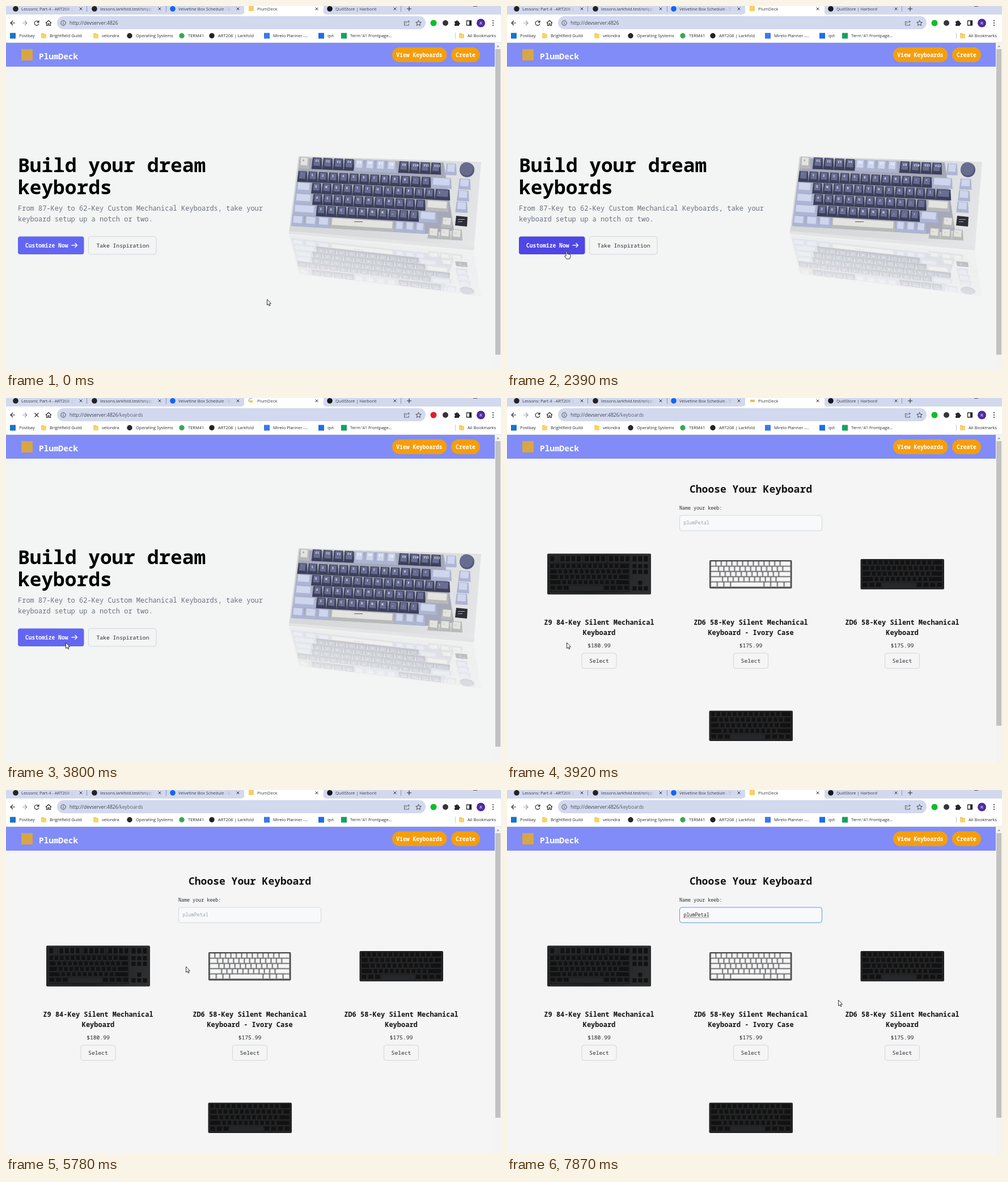
An HTML page with a canvas that plays this animation: 873 px wide and 642 px high, repeating every 7.99 s.

```html
<!DOCTYPE html>
<html lang="en">
<head>
<meta charset="utf-8">
<title>PlumDeck</title>
<style>
html, body { margin: 0; width: 100%; height: 100%; overflow: hidden; background: #f5f5f5; }
canvas { display: block; }
</style>
</head>
<body>
<canvas id="stage" width="873" height="642"></canvas>
<script>
const LOOP = 7990;
const MONO = '"Noto Sans Mono", "DejaVu Sans Mono", monospace';
const SANS = '"Open Sans", "Noto Sans", sans-serif';
const STRIP = '#d2d9ee', INK = '#2b2d31', LINE = '#d1d5db';
const stage = document.getElementById('stage').getContext('2d');
let g = stage;

// Drawing helpers
function text(s, x, y, size, { color = INK, weight = 400, font = MONO, align = 'left' } = {}) {
  g.font = `${weight} ${size}px ${font}`;
  g.fillStyle = color;
  g.textAlign = align;
  g.fillText(s, x, y);
}
function rect(x, y, w, h, color) {
  g.fillStyle = color;
  g.fillRect(x, y, w, h);
}
function box(x, y, w, h, r, fill, stroke, width = 1) {
  g.beginPath();
  g.roundRect(x, y, w, h, r);
  paint(fill, stroke, width);
}
function paint(fill, stroke, width = 1) {
  if (fill) { g.fillStyle = fill; g.fill(); }
  if (stroke) { g.strokeStyle = stroke; g.lineWidth = width; g.stroke(); }
}
function disc(x, y, r, fill, stroke, width) {
  g.beginPath();
  g.arc(x, y, r, 0, 7);
  paint(fill, stroke, width);
}
function poly(points, fill, stroke, width) {
  g.beginPath();
  points.forEach(([x, y]) => g.lineTo(x, y));
  g.closePath();
  paint(fill, stroke, width);
}
function icon(x, y, d, color = INK, width = 1.2, fill) {
  g.save();
  g.translate(x, y);
  const path = new Path2D(d);
  if (fill) { g.fillStyle = fill; g.fill(path); }
  g.strokeStyle = color;
  g.lineWidth = width;
  g.lineJoin = 'round';
  g.stroke(path);
  g.restore();
}
function layer(draw) {
  const c = document.createElement('canvas');
  c.width = 873;
  c.height = 642;
  const previous = g;
  g = c.getContext('2d');
  draw();
  g = previous;
  return c;
}

// Key layouts, in key units
const run = (first, count, last) => [...first, ...Array(count).fill(1), ...last];
const COMPACT = [
  run([], 13, [2]), run([1.5], 12, [1.5]), run([1.75], 11, [2.25]),
  run([2.25], 10, [2.75]), [1.25, 1.25, 1.25, 6.25, 1.25, 1.25, 1.25, 1.25]
];

// Hero keyboard
const TONES = {
  D: ['#3c405b', '#686d91', '#e9ebf5'],
  L: ['#adb5d3', '#ced5ed', '#ffffff'],
  B: ['#b8b9b9', '#e3e3df', '#777777']
};
function heroKey(c, r, w, tone, label = '') {
  const x = 517 + 18.15 * c - 2.6 * r;
  const slope = 0.8 + 0.05 * r;
  const y = (r < 1 ? 266 + 25 * r : 291 + 19.5 * (r - 1)) + c * slope;
  const [side, top, ink] = TONES[tone];
  const width = 18.15 * w - 0.8, drop = w * slope, h = r < 1 ? 20.5 : 19;
  poly([[x + 1.5, y], [x + width - 1, y + drop], [x + width, y + drop + h], [x - 1, y + h]], side);
  poly([[x + 3.5, y + 1], [x + width - 3, y + drop + 1], [x + width - 4, y + drop + h - 6], [x + 2.5, y + h - 6]], top);
  text(label, x + 6, y + 8, 5.5, { color: ink, weight: 600 });
}
function drawHeroKeyboard() {
  const body = g.createLinearGradient(500, 270, 830, 430);
  body.addColorStop(0, '#d4d6d8');
  body.addColorStop(0.6, '#d9dbdd');
  body.addColorStop(1, '#e5e7e8');
  poly([[516, 265], [838, 275], [825, 431], [499, 400]], body);
  poly([[500, 397], [826, 424], [825, 431], [499, 402]], '#e3e5e5');
  poly([[518, 268], [772, 276], [790, 396], [740, 402], [503, 388]], '#a5a9ba');

  heroKey(0, 0, 1.05, 'B', '⎋');
  [[1.25, 'D'], [5.35, 'L'], [9.68, 'D']].forEach(([start, tone], group) => {
    for (let i = 0; i < 4; i++) heroKey(start + i * 1.04, 0, 1.03, tone, 'F' + (group * 4 + i + 1));
  });
  heroKey(14.25, 0, 1.1, 'L');
  const rows = [
    [COMPACT[0], 'DDL', '`1234567890-='],
    [COMPACT[1], 'LDD', ' QWERTYUIOP[]\\'],
    [COMPACT[2], 'LDB', " ASDFGHJKL;'"],
    [run([2.25], 10, [1.75]), 'LDL', ' ZXCVBNM,./'],
    [[1.25, 1.25, 1.25, 6.25, 1, 1, 1], 'LLL', '']
  ];
  rows.forEach(([widths, tones, labels], r) => {
    let c = 0;
    widths.forEach((w, i) => {
      const tone = w > 6 ? 'B' : tones[i === 0 ? 0 : i === widths.length - 1 ? 2 : 1];
      heroKey(c, r + 1, w, tone, labels[i]);
      c += w;
    });
  });
  for (let r = 1; r < 4; r++) heroKey(15.65, r, 1.2, 'L');
  heroKey(14.45, 4.4, 1.15, 'B', '↑');
  ['←', '↓', '→'].forEach((s, i) => heroKey(13.3 + i * 1.13, 5.4, 1.12, 'B', s));

  poly([[794, 370], [814, 372], [813, 389], [792, 387]], '#2d2e36');
  rect(797, 376, 12, 1, '#a9abb5');
  rect(797, 380, 8, 1, '#a9abb5');
  disc(813, 289, 13, '#55597a');
  disc(812, 287, 11.5, '#686d90');
  rect(614, 380, 15, 1, '#555');
}
const heroKeyboard = layer(drawHeroKeyboard);
const hero = layer(() => {
  g.save();
  g.globalAlpha = 0.27;
  g.transform(1, 0.1395, 0, -0.5, 0, 533);
  g.drawImage(heroKeyboard, 0, 0);
  g.restore();
  g.globalCompositeOperation = 'destination-out';
  const fade = g.createLinearGradient(640, 430, 625, 505);
  fade.addColorStop(0, 'rgba(0,0,0,0)');
  fade.addColorStop(1, 'rgba(0,0,0,.6)');
  rect(490, 395, 360, 140, fade);
  g.globalCompositeOperation = 'source-over';
  g.drawImage(heroKeyboard, 0, 0);
});

// Flat product keyboards
const BLACK = { frame: '#222324', gap: '#1b1b1c', side: '#2c2d2e', top: '#121213', bar: '#262728' };
const WHITE = { frame: '#4b4b4d', gap: '#5a5a5c', side: '#b9babb', top: '#f5f5f5', bar: '#f7f7f7' };
function flatKey(x, y, w, h, look, wide) {
  rect(x + 0.5, y + 0.5, w - 1, h - 1.2, look.side);
  rect(x + 1.4, y + 0.5, w - 3, h - 2.6, wide ? look.bar : look.top);
}
function keyBlock(x, y, w, h, look) {
  const unit = w / 15, rowHeight = h / 5;
  COMPACT.forEach((widths, r) => {
    let c = 0;
    widths.forEach(k => {
      flatKey(x + c * unit, y + r * rowHeight, k * unit, rowHeight, look, k > 6);
      c += k;
    });
  });
}
function compactBoard(x, y, w, h, look) {
  box(x, y, w, h, 2, look.frame);
  rect(x + 2, y + 2, w - 4, h - 4, look.gap);
  keyBlock(x + 2, y + 2, w - 4, h - 4, look);
}
function fullBoard(x, y, w, h) {
  const shade = g.createLinearGradient(x, y, x + w, y + h);
  shade.addColorStop(0, '#262728');
  shade.addColorStop(0.5, '#1f2021');
  shade.addColorStop(1, '#303132');
  box(x, y, w, h, 2, shade);
  rect(x + 4, y + 17, 142, 50, BLACK.gap);
  keyBlock(x + 4, y + 18, 142, 48, BLACK);
  const top = y + 4;
  flatKey(x + 4, top, 10, 12, BLACK);
  [22, 65, 108].forEach(start => {
    for (let i = 0; i < 4; i++) flatKey(x + start + i * 9.6, top, 9.6, 12, BLACK);
  });
  for (let i = 0; i < 3; i++) {
    const kx = x + 149 + i * 10;
    flatKey(kx, top, 10, 12, BLACK);
    flatKey(kx, y + 18, 10, 10, BLACK);
    flatKey(kx, y + 28, 10, 10, BLACK);
    flatKey(kx, y + 57, 10, 10, BLACK);
  }
  flatKey(x + 159, y + 47, 10, 10, BLACK);
}

// Browser window
const TABS = [
  [27, 'Lessons: Part 4 - ART208 | Larkfold', '#222'],
  [166, 'lessons.larkfold.test/snippets', '#222'],
  [304, 'Velvetine Box Schedule - Drift', '#1464f4'],
  [443, 'PlumDeck', null],
  [581, 'QuillStore | Harbord', '#17171c']
];
const BOOKMARKS = [
  [23, 'Postbay', 'square', '#1973c8'], [77, 'Brightfield Guild', 'folder'],
  [169, 'velondra', 'folder'], [229, 'Operating Systems', 'disc', '#27282b'],
  [321, 'TERM41', 'disc', '#38a852'], [374, 'ART208 | Larkfold', 'disc', '#222'],
  [471, 'Mirelo Planner -...', 'square', '#3979e8'], [567, 'qvt', 'square', '#1f6bea'],
  [607, "Term '41 Frontpage...", 'square', '#18a05e'], [814, 'All Bookmarks', 'folder']
];
function folder(x, y) {
  box(x, y, 5, 4, 1, '#e9bd4e');
  box(x, y + 1, 9, 8, 1, '#fad16c');
}
function drawTabs(t, loading) {
  rect(0, 0, 873, 15, STRIP);
  box(420, -8, 140, 24, 5, '#fff');
  rect(415, 13, 150, 3, '#fff');
  box(408, 2, 12, 13, [0, 0, 5, 0], STRIP);
  box(560, 2, 12, 13, [0, 0, 0, 5], STRIP);
  TABS.forEach(([x, label, color]) => {
    const ink = g.createLinearGradient(x + 76, 0, x + 94, 0);
    ink.addColorStop(0, '#3b3e44');
    ink.addColorStop(1, 'rgba(59,62,68,0)');
    text(label, x, 7.5, 7.5, { color: ink, font: SANS });
    icon(x + 105, 5, 'M-2.3-2.3 2.3 2.3M2.3-2.3-2.3 2.3', INK, 1);
    if (color) disc(x - 10, 5, 4.8, color);
  });
  if (loading) {
    const turn = Math.floor(t / 120) * 0.9;
    rect(430, 4, 5, 4, '#f3c64b');
    g.beginPath();
    g.arc(433, 5, 4.7, turn, turn + 2.2);
    paint(null, '#5a83d8', 1);
  } else if (t >= 3920 && t < 4040) {
    rect(429, 3, 8, 4, '#f0bc45');
  } else {
    rect(428, 0, 9, 9, '#f6cd68');
  }
  [142, 282, 696].forEach(x => rect(x, 0, 1, 10, '#8f97ac'));
  icon(711, 5, 'M-4 0H4M0-4V4', INK, 1.1);
  rect(824, 0, 7, 1, '#555');
}
function drawToolbar(t, loading) {
  rect(0, 15, 873, 50, '#fff');
  icon(12, 30, 'M4 0H-4M0-4-4 0 0 4');
  icon(33, 30, 'M-4 0H4M0-4 4 0 0 4', '#9a9da3');
  if (loading) icon(54, 30, 'M-3.5-3.5 3.5 3.5M3.5-3.5-3.5 3.5');
  else icon(54, 30, 'M3.4-2A4 4 0 1 0 4 1.2M4-4.5V-1.2H.7');
  icon(75, 30, 'M-5 0 0-4.5 5 0M-3.5-1V4.5H-1V1H1V4.5H3.5V-1');

  box(90, 18, 650, 23, 11.5, STRIP);
  disc(101, 30, 4.2, null, '#44474d', 1);
  rect(100.5, 29.3, 1, 3, '#44474d');
  rect(100.5, 27.5, 1, 1, '#44474d');
  const path = t >= 3560 ? '/keyboards' : '';
  const host = 'http://devserver:4826';
  text(host, 112, 33, 8.5, { color: '#43464d', font: SANS });
  text(path, 112 + g.measureText(host).width, 33, 8.5, { color: '#60646d', font: SANS });
  icon(707, 30, 'M-1.5-2.5H-4.5V4H3.5V1.5M-2 1.5C-2-1.5 0-2.5 4-2.5M2-4.7 4.3-2.5 2-.2', '#50535a', 0.9);
  icon(727.5, 30, 'M0-4.8 1.4-1.5 4.8-1.2 2.2 1 3 4.5 0 2.6-3 4.5-2.2 1-4.8-1.2-1.4-1.5Z', '#44474d', 1);

  disc(754, 30, 5.5, loading ? '#e01f2d' : '#0fbd2c');
  disc(775, 30, 5, '#37333a');
  icon(795.5, 30, 'M-4-2.5H-1.5A1.3 1.3 0 1 1 1-2.5H3V0A1.3 1.3 0 1 1 3 2.3V4.5H-4V2A1.3 1.3 0 0 0-4-.5Z', '#25272b', 1, '#25272b');
  icon(816.5, 30, 'M-4-4H4V4H-4Z', '#25272b', 1.3);
  rect(817, 26, 4, 8, '#25272b');
  disc(837.5, 30, 7.5, '#4b2a9c');
  text('R', 837.5, 33, 8, { color: '#fff', font: SANS, align: 'center' });
  [-4, 0, 4].forEach(d => disc(859, 30 + d, 1.1, INK));

  BOOKMARKS.forEach(([x, label, kind, color]) => {
    text(label, x, 55, 7.5, { font: SANS });
    if (kind === 'folder') folder(x - 15, 48);
    else if (kind === 'disc') disc(x - 11, 52.5, 4.7, color);
    else rect(x - 16, 47.5, 10, 10, color);
  });
  rect(792, 47, 1, 11, '#c5cada');
  rect(0, 64, 873, 1, '#e3e5ea');
}

// Web pages
function drawHeader() {
  rect(0, 65, 862, 42, '#818cf8');
  rect(27, 76, 20, 20, '#d8a642');
  text('PlumDeck', 58, 94, 14.4, { color: '#fff', weight: 700 });
  const label = { color: '#fff', weight: 700, align: 'center' };
  box(681, 73, 96.5, 26, 13, '#f59e0b');
  text('View Keyboards', 729, 89.5, 9.7, label);
  box(785, 73, 51, 26, 13, '#f59e0b');
  text('Create', 810.5, 89.5, 9.7, label);
}
function drawScrollbar(bottom) {
  rect(862, 65, 11, 577, '#f3f3f3');
  rect(863, 76, 9, bottom - 76, '#c1c1c1');
  poly([[867.5, 69], [870, 72.5], [865, 72.5]], '#a3a3a3');
}
function drawHome(t) {
  rect(0, 65, 873, 577, '#f3f5f4');
  text('Build your dream', 21, 293, 34.5, { color: '#000', weight: 700 });
  text('keybords', 21, 332, 34.5, { color: '#000', weight: 700 });
  text('From 87-Key to 62-Key Custom Mechanical Keyboards, take your', 21, 361, 12, { color: '#6b7280' });
  text('keyboard setup up a notch or two.', 21, 380, 12, { color: '#6b7280' });
  const hover = t >= 2120 && t < 3680;
  box(21, 406.5, 116.5, 31.5, 4, hover ? '#4f46e5' : '#6366f1');
  text('Customize Now', 34, 426, 9.7, { color: '#fff', weight: 600 });
  icon(120.5, 422, 'M-5 0H5M1-4 5 0 1 4', '#fff', 1.3);
  box(145.5, 406.5, 119.5, 31.5, 4, null, LINE);
  text('Take Inspiration', 159.5, 426, 9.7);
  g.drawImage(hero, 0, 0);
}
function drawProduct(cx, name, more, price) {
  const title = { color: '#111', weight: 600, align: 'center' };
  text(name, cx, 400, 12, title);
  text(more, cx, 418, 12, title);
  text(price, cx, 440, 9.7, { color: '#222', align: 'center' });
  box(cx - 30.5, 450, 61, 27, 4, null, LINE);
  text('Select', cx, 467, 9.7, { align: 'center' });
}
function drawShop(t) {
  rect(0, 65, 873, 577, '#f5f5f5');
  text('Choose Your Keyboard', 430, 167, 18, { color: '#111', weight: 700, align: 'center' });
  text('Name your keeb:', 304, 197, 8.4);
  const focused = t >= 6570, typed = t >= 7250;
  box(304.5, 207, 251, 27, 4, '#f8f9fa', focused ? '#5b93ee' : LINE);
  text('plumPetal', 311.5, 223, 8.4, { color: typed ? '#222' : '#9ca3af' });
  if (typed) {
    g.beginPath();
    for (let i = 0; i <= 30; i++) g.lineTo(311.5 + i * 1.5, 224.5 + i % 2);
    paint(null, '#e63b3b', 0.8);
  }
  if (focused && t < 7000) rect(311, 215, 1, 11, '#222');
  if (typed && t < 7750) rect(356, 214, 1, 11, '#222');

  fullBoard(71, 274.5, 183, 72);
  compactBoard(357, 286, 145.5, 50, WHITE);
  compactBoard(623.5, 284, 147.5, 53.5, BLACK);
  compactBoard(356.5, 551.5, 147.5, 53.5, BLACK);
  drawProduct(162.5, 'Z9 84-Key Silent Mechanical', 'Keyboard', '$180.99');
  drawProduct(430, 'ZD6 58-Key Silent Mechanical', 'Keyboard - Ivory Case', '$175.99');
  drawProduct(697, 'ZD6 58-Key Silent Mechanical', 'Keyboard', '$175.99');
}

// Pointer: start time, x, y, shape
const POINTER = [
  [0, 460, 517, 'arrow'], [150, 456, 511, 'arrow'], [430, 457, 509, 'arrow'], [550, 459, 511, 'arrow'],
  [700, 421, 505, 'arrow'], [820, 371, 550, 'arrow'], [1220, 371, 538, 'arrow'], [1340, 369, 480, 'arrow'],
  [1460, 367, 422, 'arrow'], [1610, 347, 385, 'arrow'], [1730, 318, 356, 'arrow'], [1880, 245, 376, 'arrow'],
  [2000, 165, 412, 'arrow'], [2120, 113, 438, 'hand'], [2240, 104, 434, 'hand'], [2390, 105, 432, 'hand'],
  [3680, 105, 431, 'arrow'], [4760, 111, 434, 'arrow'], [4880, 97, 423, 'arrow'], [5030, 125, 411, 'arrow'],
  [5150, 165, 398, 'arrow'], [5270, 220, 383, 'arrow'], [5390, 272, 368, 'arrow'], [5510, 308, 357, 'arrow'],
  [5630, 321, 363, 'arrow'], [5780, 317, 311, 'arrow'], [5900, 344, 271, 'arrow'], [6050, 358, 240, 'arrow'],
  [6170, 366, 221, 'beam'], [6320, 366, 219, 'beam'], [7500, 366, 218, 'beam'],
  [7750, 470, 290, 'arrow'], [7870, 584, 370, 'arrow']
];
const SHAPES = {
  arrow: ['M.5.5V10.7L2.8 8.6 4.3 12 5.9 11.3 4.4 8H7.5Z', '#222', 0.9, '#fff'],
  hand: ['M-1 8V1Q0-.6 1 1V5.2Q2.3 4.4 3 5.7 4.2 5 5 6.2 6.6 5.8 6.8 7.5V10L5.5 14H0L-3.3 9.7Q-3.6 7.7-1 9Z', '#222', 0.9, '#fff'],
  beam: ['M-2 .5H2.5M.2.5V11.5M-2 11.5H2.5', '#333', 0.9, null]
};
function drawPointer(t) {
  const [, x, y, shape] = POINTER.findLast(([start]) => start <= t);
  const [d, color, width, fill] = SHAPES[shape];
  icon(x, y, d, color, width, fill);
}

function draw(t) {
  const loading = t >= 3560 && t < 3920;
  const shop = t >= 3920;
  (shop ? drawShop : drawHome)(t);
  drawHeader();
  drawScrollbar(shop ? 578 : 615);
  drawTabs(t, loading);
  drawToolbar(t, loading);
  drawPointer(t);
}
const began = performance.now();
function tick() {
  draw((performance.now() - began) % LOOP);
  requestAnimationFrame(tick);
}
tick();
</script>
</body>
</html>
```
